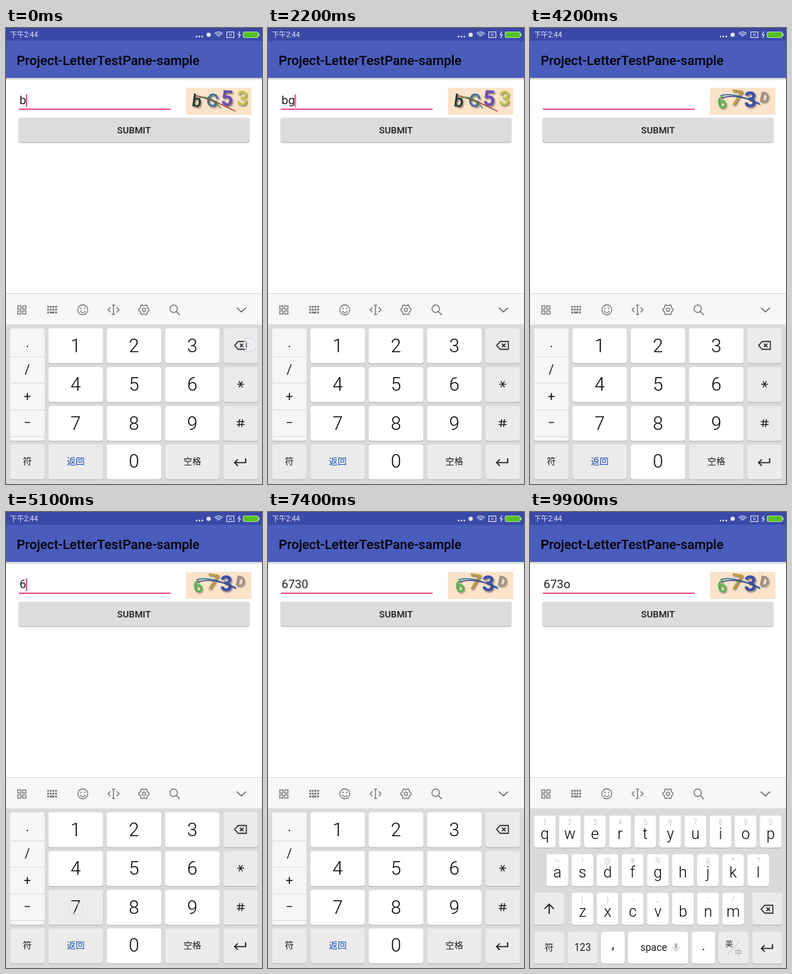
Write an HTML page with a canvas that moves like this. It is 360x640 px and loops after 10 s.

```html
<!DOCTYPE html>
<html lang="en">
<head>
<meta charset="utf-8">
<title>Code entry demo</title>
<style>
  html, body { margin: 0; width: 100%; height: 100%; overflow: hidden; background: #fff; }
  #stage { position: absolute; left: 0; top: 0; width: 360px; height: 640px; overflow: hidden; }
  canvas { display: block; }
  #toast {
    position: absolute; left: 104px; top: 541px; width: 152px; height: 40px;
    border-radius: 6px; background: #3a3a3a; color: #fff; opacity: 0;
    font: 300 12.2px/40px Roboto, sans-serif; text-align: center; white-space: nowrap;
  }
</style>
</head>
<body>
<div id="stage"><canvas id="view" width="360" height="640"></canvas><div id="toast"></div></div>
<script>
const LOOP = 10000, STEP = 100;
const INK = '#1c1c1c', PINK = '#f4558c', GREY = '#777', SIDE = '#ebebeb';
const FACE = "Roboto, 'Noto Sans CJK SC', 'Noto Sans CJK', sans-serif";
const g = document.getElementById('view').getContext('2d');
const toastBox = document.getElementById('toast');

// Timeline, in ms
const typed = [[0, 'b'], [100, ''], [1800, 'b'], [2000, 'bg'], [2500, 'bg5'], [2800, 'bg53'],
  [4000, ''], [5000, '6'], [5200, '67'], [5500, '673'], [5800, '6730'], [7800, '673'], [8300, '673o']];
const caretFlips = [600, 800, 1000, 1500, 3400, 3700, 4100, 4300, 4500, 4700, 6000, 6200,
  6700, 7100, 7300, 7800, 8600, 8900, 9300, 9500, 9800];
const boards = [[0, 'digits'], [1100, 'letters'], [2200, 'digits'], [7600, 'letters']];
const touches = [
  [0, 200, 342, 445], [1000, 1100, 98, 610], [1700, 1800, 214, 557], [1900, 2000, 180, 503],
  [2100, 2200, 73, 611], [2400, 2500, 180, 512], [2700, 2800, 257, 447], [3100, 3300, 312, 153],
  [3900, 4100, 300, 103], [4900, 5000, 268, 502], [5100, 5200, 98, 556], [5400, 5500, 288, 448],
  [5700, 5800, 180, 613], [6400, 6600, 305, 152], [7500, 7600, 98, 608], [7700, 7800, 333, 558],
  [8200, 8300, 317, 450], [8800, 9000, 312, 152]];
const presses = [[3100, 312], [6400, 305], [8800, 312]];
const toasts = [
  { from: 3130, out: 3650, rise: 30, text: 'Verify Success!Welcome' },
  { from: 6470, out: 7250, rise: 30, text: 'Verify Success!Welcome' },
  { from: 8900, out: 9650, rise: 0, text: 'Verify Failed!Try Again' }];

const clamp = v => Math.max(0, Math.min(1, v));
const latest = (list, t) => list.filter(e => e[0] <= t).pop()[1];
let touch = null;

function text(s, x, y, size, color = INK, weight = 400, align = 'center') {
  g.font = `${weight} ${size}px ${FACE}`;
  g.fillStyle = color;
  g.textAlign = align;
  g.fillText(s, x, y);
}
function rect(x, y, w, h, color) {
  g.fillStyle = color;
  g.fillRect(x, y, w, h);
}
function round(x, y, w, h, r, color) {
  g.beginPath();
  g.roundRect(x, y, w, h, r);
  g.fillStyle = color;
  g.fill();
}
function line(points, color, width = 1.4) {
  g.beginPath();
  points.forEach(([x, y], i) => i ? g.lineTo(x, y) : g.moveTo(x, y));
  g.strokeStyle = color;
  g.lineWidth = width;
  g.stroke();
}
function ring(x, y, r, color, width = 1.3, a = 0, b = Math.PI * 2) {
  g.beginPath();
  g.arc(x, y, r, a, b);
  g.strokeStyle = color;
  g.lineWidth = width;
  g.stroke();
}
function disc(x, y, r, color) {
  g.beginPath();
  g.arc(x, y, r, 0, Math.PI * 2);
  g.fillStyle = color;
  g.fill();
}

function drawHeader() {
  const shade = g.createLinearGradient(0, 70, 0, 74);
  shade.addColorStop(0, 'rgba(0,0,0,.22)');
  shade.addColorStop(1, 'rgba(0,0,0,0)');
  rect(0, 70, 360, 4, shade);
  rect(0, 0, 360, 70, '#4a5cbc');
  rect(0, 0, 360, 18, '#3a49a7');
  const white = '#e0e3f4';
  text('下午2:44', 5.5, 13, 10, white, 400, 'left');
  [268, 272, 276].forEach(x => disc(x, 12, 1.2, white));
  disc(285, 9.5, 3, white);
  [2.5, 5, 7.5].forEach(r => ring(299, 13, r, white, 1.2, -Math.PI * .77, -Math.PI * .23));
  g.strokeStyle = white;
  g.lineWidth = 1;
  g.strokeRect(310.5, 5.5, 10, 8);
  line([[313.5, 7.5], [317.5, 11.5]], white, 1);
  line([[317.5, 7.5], [313.5, 11.5]], white, 1);
  line([[329, 5], [326.5, 9.5], [329.5, 9.5], [327, 14]], white, 1.2);
  round(333, 5, 22, 9, 2.5, '#a9d6a0');
  round(334, 6, 20, 7, 2, '#55c01e');
  rect(355, 7.5, 1.5, 4, '#a9d6a0');
  text('Project-LetterTestPane-sample', 15, 51.5, 18.4, '#000', 500, 'left');
}

function glyph(ch, x, y, size, turn, color, weight = 700) {
  g.save();
  g.translate(x, y);
  g.rotate(turn);
  g.shadowColor = 'rgba(60,50,40,.55)';
  g.shadowBlur = 2;
  g.shadowOffsetX = 1.5;
  g.shadowOffsetY = 2;
  text(ch, 0, size * .36, size, color, weight);
  g.restore();
}
function curve(x0, y0, x1, y1, x2, y2, color) {
  g.beginPath();
  g.moveTo(x0, y0);
  g.quadraticCurveTo(x1, y1, x2, y2);
  g.strokeStyle = color;
  g.lineWidth = 1.4;
  g.stroke();
}
function drawCaptcha(second) {
  rect(253, 84, 92, 38, '#fbe3ca');
  if (second) {
    glyph('6', 269.5, 104, 23, -.22, '#4fb84a', 500);
    glyph('7', 291, 97.5, 30, .14, '#bd9b3f', 500);
    glyph('3', 310, 99.5, 31, 0, '#3b4fb0');
    glyph('D', 329.5, 97, 20, .2, '#988c80', 500);
    curve(268, 95, 284, 89, 323, 106, '#2c6b9c');
    curve(270, 98, 294, 91, 324, 108, '#3b4a86');
  } else {
    glyph('b', 268.5, 102, 24, .14, '#203a33', 500);
    glyph('G', 290.5, 101, 25, .3, '#3e6f9e', 500);
    glyph('5', 311, 98, 30, .06, '#6a4fb4');
    glyph('3', 332.5, 98, 28, .05, '#c2cc42', 500);
    curve(268, 95, 292, 101, 323, 117, '#a83a38');
    curve(272, 98, 288, 94, 302, 113, '#3d8a4c');
  }
}

function drawForm(t) {
  const value = latest(typed, t);
  text(value, 19, 107, 16.8, '#202020', 400, 'left');
  const end = 18.5 + g.measureText(value).width;
  rect(18, 113, 213.5, 2, PINK);
  if (caretFlips.filter(f => f <= t).length % 2 === 0) rect(end, 93, 2, 18, PINK);
  drawCaptcha(t >= 4000);

  g.save();
  g.shadowColor = 'rgba(0,0,0,.35)';
  g.shadowBlur = 2;
  g.shadowOffsetY = 1;
  round(18, 126, 324, 34, 2, '#dcdcdc');
  g.restore();
  for (const [start, x] of presses) {
    const age = t - start;
    if (age < 0 || age > 520) continue;
    const p = clamp(age / 370);
    g.save();
    g.beginPath();
    g.roundRect(18, 126, 324, 34, 2);
    g.clip();
    disc(x + (180 - x) * p, 153 - 10 * p, 20 + 155 * p, `rgba(0,0,0,${.05 * clamp((520 - age) / 150)})`);
    g.restore();
  }
  text('SUBMIT', 180, 148, 13, INK, 500);
}

function drawToolbar() {
  rect(0, 372, 360, 44, '#f7f7f7');
  rect(0, 372, 360, 1, '#dadada');
  g.strokeStyle = GREY;
  g.lineWidth = 1.3;
  for (const x of [16.5, 23.5]) for (const y of [390, 397]) g.strokeRect(x, y, 4.5, 4.5);
  for (let i = 0; i < 4; i++) {
    rect(58 + i * 3.7, 390, 2.6, 2.6, GREY);
    rect(58 + i * 3.7, 394, 2.6, 2.6, GREY);
  }
  rect(58, 398, 2.6, 2.6, GREY);
  rect(61.7, 398, 6.3, 2.6, GREY);
  rect(69.1, 398, 2.6, 2.6, GREY);

  ring(108, 395.5, 7, GREY);
  disc(105.5, 393.5, 1.1, GREY);
  disc(110.5, 393.5, 1.1, GREY);
  ring(108, 396, 3.6, GREY, 1.2, .2, Math.PI - .2);

  line([[147, 392], [143.5, 395.5], [147, 399]], GREY);
  line([[155.5, 392], [159, 395.5], [155.5, 399]], GREY);
  line([[151.2, 389], [151.2, 402]], GREY);
  line([[149, 389], [153.5, 389]], GREY);
  line([[149, 402], [153.5, 402]], GREY);

  const gear = [];
  for (let i = 0; i <= 48; i++) {
    const a = i / 48 * Math.PI * 2, r = 6.6 + Math.cos(a * 6) * .9;
    gear.push([194 + Math.cos(a) * r, 395.5 + Math.sin(a) * r]);
  }
  line(gear, GREY);
  ring(194, 395.5, 2.3, GREY);

  ring(235.8, 394, 5.2, GREY, 1.4);
  line([[239.6, 398], [244.5, 403]], GREY, 1.6);
  line([[324.5, 392.5], [331, 398.5], [337.5, 392.5]], '#666', 1.6);
}

function key(x, y, w, h, color = '#fff') {
  const held = touch && touch[2] > x && touch[2] < x + w && touch[3] > y && touch[3] < y + h;
  round(x, y + 1, w, h, 4, '#b0b0b0');
  round(x, y, w, h, 4, held && color === '#fff' ? '#ececec' : color);
}

function backspace(x, y) {
  g.beginPath();
  g.moveTo(x - 8.5, y);
  g.lineTo(x - 3.5, y - 5.5);
  g.lineTo(x + 8, y - 5.5);
  g.lineTo(x + 8, y + 5.5);
  g.lineTo(x - 3.5, y + 5.5);
  g.closePath();
  g.strokeStyle = INK;
  g.lineWidth = 1.3;
  g.stroke();
  line([[x - 1, y - 2.5], [x + 4, y + 2.5]], INK);
  line([[x + 4, y - 2.5], [x - 1, y + 2.5]], INK);
}
function enter(x, y) {
  line([[x + 8, y - 5], [x + 8, y + 1], [x - 7, y + 1]], INK, 1.7);
  line([[x - 3, y - 3.5], [x - 7.5, y + 1], [x - 3, y + 5.5]], INK, 1.7);
}

function drawDigits() {
  const rows = [421.5, 476, 530.5, 584.5], h = 49;
  key(5.5, 421.5, 49, 158, '#f6f6f6');
  [461, 498, 535.5, 573].forEach(y => rect(6, y, 48, 1, '#dcdcdc'));
  ['.', '/', '+', '−'].forEach((s, i) => text(s, 30, [448, 485, 523, 560][i], 18));
  for (let n = 1; n <= 9; n++) {
    const x = 59.5 + (n - 1) % 3 * 82, y = rows[Math.floor((n - 1) / 3)];
    key(x, y, 77, h);
    text(n, x + 38.5, y + 33, 26, '#000', 300);
  }
  for (const y of rows) key(305.5, y, 49, h, SIDE);
  backspace(330, 445.5);
  for (let i = 0; i < 3; i++) {
    const a = i * Math.PI / 3, dx = Math.cos(a) * 5, dy = Math.sin(a) * 5;
    line([[330 - dx, 500 - dy], [330 + dx, 500 + dy]], INK, 1.2);
  }
  for (const d of [-2, 2]) {
    line([[324.5, 554.5 + d], [335.5, 554.5 + d]], INK, 1.3);
    line([[330.6 + d, 549], [329.4 + d, 560]], INK, 1.3);
  }
  key(5.5, 584.5, 49, h, SIDE);
  text('符', 30, 613, 12.5);
  key(59.5, 584.5, 77, h, SIDE);
  text('返回', 98, 613, 12.5, '#1750b8');
  key(141.5, 584.5, 77, h);
  text('0', 180, 617, 26, '#000', 300);
  key(223.5, 584.5, 77, h, SIDE);
  text('空格', 262, 613, 12.5);
  enter(329, 609);
}

function drawLetters() {
  const pitch = 35.3, h = 45;
  const rows = [
    ['qwertyuiop', '1234567890', 5.5, 426],
    ['asdfghjkl', "~!@#%'&*?", 23.2, 480.3],
    ['zxcvbnm', '()-_:;/', 58.6, 534.6]];
  for (const [letters, hints, left, y] of rows) {
    [...letters].forEach((c, i) => {
      const x = left + i * pitch;
      key(x, y, 30.5, h);
      text(hints[i], x + 15.3, y + 12.5, 10, '#aaa', 300);
      text(c, x + 15.3, y + 33, 21.5, '#000', 300);
    });
  }
  key(5.5, 534.6, 42.5, h, SIDE);
  line([[27, 564], [27, 550.5]], INK, 1.7);
  line([[20.5, 557], [27, 550.5], [33.5, 557]], INK, 1.7);
  key(312.3, 534.6, 42.5, h, SIDE);
  backspace(333.5, 557.5);

  const y = 589;
  key(5.5, y, 42.5, h, SIDE);
  text('符', 27, 615.5, 12.5);
  key(53, y, 42.5, h, SIDE);
  text('123', 74, 616, 13.8);
  key(100, y, 33, h);
  text(',', 116.5, 613, 19);
  key(138, y, 84.5, h);
  text('space', 174, 616, 14);
  round(203, 605, 4.6, 8, 2.3, '#bbb');
  ring(205.3, 610, 4.6, '#aaa', 1, 0, Math.PI);
  line([[205.3, 614.5], [205.3, 617]], '#aaa', 1);
  key(227.3, y, 33, h);
  text('.', 244, 615, 19);
  key(265, y, 42.5, h, SIDE);
  text('英', 280, 610, 10.5);
  line([[278, 620], [295, 603]], '#bbb', 1);
  text('中', 293, 622, 10, '#999');
  key(312.3, y, 42.5, h, SIDE);
  enter(333, 611.5);
}

function drawTouch(t) {
  if (!touch) return;
  const [, to, x, y] = touch;
  g.save();
  g.globalAlpha = clamp((to - t) / 200);
  disc(x, y, 9, 'rgba(235,235,248,.2)');
  ring(x, y, 7, 'rgba(240,240,250,.7)', 3.5);
  ring(x, y, 10, 'rgba(120,120,180,.2)', 1);
  g.restore();
}

function placeToast(t) {
  const item = toasts.find(o => t >= o.from && t < o.out + 150);
  if (!item) {
    toastBox.style.opacity = 0;
    return;
  }
  const u = clamp((t - item.from) / 300);
  toastBox.textContent = item.text;
  toastBox.style.opacity = .9 * u * clamp((item.out + 150 - t) / 150);
  toastBox.style.transform = `translateY(${item.rise * (1 - u)}px)`;
}

function draw(now) {
  const t = Math.floor(now % LOOP / STEP) * STEP;
  touch = touches.find(([from, to]) => t >= from && t < to);
  rect(0, 0, 360, 640, '#fff');
  drawHeader();
  drawForm(t);
  rect(0, 416, 360, 224, '#dadada');
  drawToolbar();
  if (latest(boards, t) === 'digits') drawDigits();
  else drawLetters();
  drawTouch(t);
  placeToast(t);
}

const began = performance.now();
function tick() {
  draw(performance.now() - began);
  requestAnimationFrame(tick);
}
tick();
</script>
</body>
</html>
```
